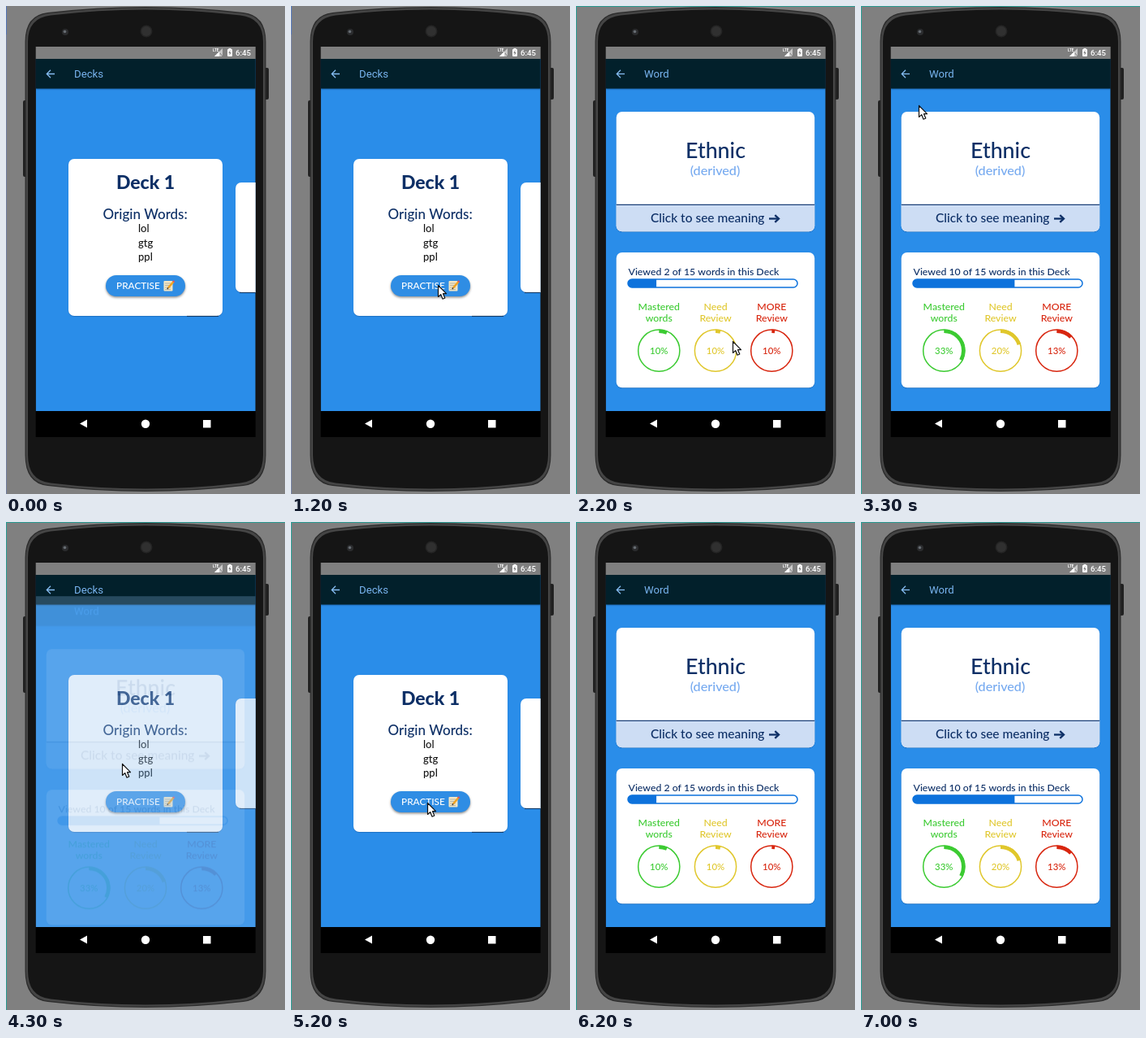
These frames come from a looping animation (344 by 600 pixels, 7100 ms). An HTML page with a canvas:

```html
<!DOCTYPE html>
<html lang="en">
<head>
<meta charset="utf-8">
<title>Flashcard decks</title>
<style>
html, body { margin: 0; width: 100%; height: 100%; overflow: hidden; background: #808080; }
canvas { display: block; width: 344px; height: 600px; }
</style>
</head>
<body>
<canvas id="stage"></canvas>
<script>
const W = 344, H = 600, LOOP = 7100, STEP = 100;
const LEFT = 36.7, WIDE = 271;
const BLUE = '#2a8de9', NAVY = '#0d2f66', FILL = '#0d72dc', HEAD = '#02202b', VEIL = '#8cbeee';
const DECK_ENTRIES = [1500, 5460], BACK = 4150;
const dpr = window.devicePixelRatio || 1;

function sheet(canvas) {
  canvas.width = W * dpr;
  canvas.height = H * dpr;
  const c = canvas.getContext('2d');
  c.scale(dpr, dpr);
  return c;
}
const stage = document.getElementById('stage');
const main = sheet(stage);
const layer = document.createElement('canvas');
const page = sheet(layer);

const clamp = (v, a = 0, b = 1) => Math.min(b, Math.max(a, v));
const mix = (a, b, k) => a + (b - a) * k;
const easeOut = k => 1 - (1 - k) ** 2;

function box(c, x, y, w, h, r, fill) {
  c.beginPath();
  c.roundRect(x, y, w, h, r);
  c.fillStyle = fill;
  c.fill();
}

function disc(c, x, y, r, fill) {
  c.beginPath();
  c.arc(x, y, r, 0, Math.PI * 2);
  c.fillStyle = fill;
  c.fill();
}

function poly(c, points, fill) {
  c.beginPath();
  points.forEach(([x, y]) => c.lineTo(x, y));
  c.closePath();
  c.fillStyle = fill;
  c.fill();
}

function line(c, points, color, width) {
  c.beginPath();
  points.forEach(([x, y]) => c.lineTo(x, y));
  c.strokeStyle = color;
  c.lineWidth = width;
  c.stroke();
}

function text(c, str, x, y, size, color, { align = 'center', weight = 500, face = 'Lato' } = {}) {
  c.font = `${weight} ${size}px ${face}, sans-serif`;
  c.textAlign = align;
  c.fillStyle = color;
  c.fillText(str, x, y);
}

function shadow(c, color, blur, dy, draw) {
  c.save();
  c.shadowColor = color;
  c.shadowBlur = blur * dpr;
  c.shadowOffsetY = dy * dpr;
  draw();
  c.restore();
}

function card(c, x, y, w, h) {
  shadow(c, 'rgba(0,30,80,.3)', 1, 0.7, () => box(c, x, y, w, h, 7, '#fff'));
}

// Case outline with bowed top and bottom, inset by d
function shell(c, d, fill) {
  const l = 23.5 + d, r = 320.5 - d, top = 8 + d, low = 590 - d;
  c.beginPath();
  c.moveTo(l, 44);
  c.quadraticCurveTo(l, top + 3, l + 28, top);
  c.quadraticCurveTo(172, top - 14, r - 28, top);
  c.quadraticCurveTo(r, top + 3, r, 44);
  c.lineTo(r, 552);
  c.quadraticCurveTo(r, low - 3, r - 28, low);
  c.quadraticCurveTo(172, low + 14, l + 28, low);
  c.quadraticCurveTo(l, low - 3, l, 552);
  c.fillStyle = fill;
  c.fill();
}

function phone(c, t) {
  c.fillStyle = '#808080';
  c.fillRect(0, 0, W, H);
  if (t < 1300) {
    c.fillStyle = '#7480a0';
    c.fillRect(0, 0, 1, H);
    c.fillStyle = '#5577b8';
    c.fillRect(0, 0, 1, 35);
  } else {
    c.fillStyle = '#2c9c94';
    c.fillRect(0, 0, W, 1);
    c.fillRect(0, 0, 1, H);
  }
  box(c, 21, 116, 5, 94, 2, '#202020');
  box(c, 318, 76, 6, 39, 2, '#202020');
  shell(c, 0, '#2c2c2c');
  shell(c, 1.2, '#454545');
  shell(c, 3.5, '#151515');
  disc(c, 173, 31, 7.5, '#242424');
  disc(c, 173, 31, 6, '#303030');
  disc(c, 73, 32, 4, '#2b2c2e');
  disc(c, 72.5, 31.5, 1.8, '#666c72');
}

function bars(c) {
  c.fillStyle = '#7f7f7f';
  c.fillRect(LEFT, 50, WIDE, 15);
  text(c, 'LTE', 255, 56, 4.5, '#fff', { align: 'left', weight: 700, face: 'Roboto' });
  poly(c, [[257, 62], [267, 62], [267, 52]], '#c9c9c9');
  poly(c, [[257, 62], [263, 62], [263, 56]], '#fff');
  line(c, [[264, 58], [267, 62]], '#7f7f7f', 1);
  box(c, 273, 53, 6, 9, 1, '#fff');
  c.fillStyle = '#fff';
  c.fillRect(274.5, 52, 3, 2);
  poly(c, [[276.5, 54], [274.3, 58], [275.8, 58], [275.4, 61], [277.7, 57], [276.2, 57]], '#7f7f7f');
  text(c, '6:45', 302, 61, 9.6, '#fff', { align: 'right', face: 'Roboto' });

  c.fillStyle = '#000';
  c.fillRect(LEFT, 498, WIDE, 32);
  poly(c, [[91, 513.5], [100, 508.5], [100, 518.5]], '#fff');
  disc(c, 172, 513.7, 5.2, '#fff');
  c.fillStyle = '#fff';
  c.fillRect(243, 509, 9.5, 9.5);
}

function header(c, title, arrow = 1) {
  c.fillStyle = BLUE;
  c.fillRect(LEFT, 65, WIDE, 433);
  shadow(c, 'rgba(0,20,50,.5)', 2, 0.7, () => {
    c.fillStyle = HEAD;
    c.fillRect(LEFT, 65, WIDE, 36.5);
  });
  c.globalAlpha = arrow;
  line(c, [[60, 83.5], [50.8, 83.5]], '#86bdf2', 1.3);
  line(c, [[55, 78.8], [50.3, 83.5], [55, 88.2]], '#86bdf2', 1.3);
  c.globalAlpha = 1;
  text(c, title, 84, 88, 13.2, '#79b4ef', { align: 'left', weight: 400, face: 'Roboto' });
}

function memo(c) {
  box(c, 194.5, 338, 11, 12.5, 1, '#f3e6c4');
  for (let y = 341; y < 350; y += 2.5) line(c, [[196, y], [203, y]], '#a9a79c', 0.8);
  line(c, [[206.5, 339], [200, 346.5]], '#f0a322', 2.6);
  line(c, [[207.3, 338], [206.2, 339.3]], '#d9516a', 2.6);
  line(c, [[200, 346.5], [198.8, 348]], '#4a3a2c', 1.4);
}

function decks(c) {
  header(c, 'Decks');
  card(c, 77, 188, 190, 193);
  line(c, [[223, 381.4], [262, 381.4]], '#12365f', 1);
  card(c, 283, 217, 190, 135);
  line(c, [[288, 352.4], [307, 352.4]], '#12365f', 1);
  text(c, 'Deck 1', 172, 225, 23, NAVY, { weight: 800 });
  text(c, 'Origin Words:', 171.7, 262, 17, NAVY);
  ['lol', 'gtg', 'ppl'].forEach((w, i) =>
    text(c, w, 163, 278 + 17.5 * i, 13, '#151515', { align: 'left' }));
  shadow(c, 'rgba(0,0,0,.45)', 3, 1.5, () => box(c, 123, 331, 98, 26, 13, '#2f8de4'));
  text(c, 'PRACTISE', 136, 348, 11.8, '#fff', { align: 'left' });
  memo(c);
}

function gauge(c, x, color, label, share, pct) {
  text(c, label[0], x, 374, 12.3, color);
  text(c, label[1], x, 387.5, 12.3, color);
  c.strokeStyle = color;
  c.lineWidth = 1.5;
  c.beginPath();
  c.arc(x, 423.7, 25.6, 0, Math.PI * 2);
  c.stroke();
  c.lineWidth = 4.5;
  c.beginPath();
  c.arc(x, 423.7, 24, -Math.PI / 2, Math.PI * (2 * share - 0.5));
  c.stroke();
  text(c, pct + '%', x, 428, 11.4, color);
}

// e: ms since the page was opened
function word(c, e, shown) {
  const count = clamp(Math.floor((e - 500) / 100), 0, 10);
  const drop = clamp(e / 500);
  const grown = count / 10;
  header(c, 'Word', shown ** 8);

  card(c, 49.7, 130, 244.5, 147.3);
  box(c, 49.7, 244, 244.5, 33.3, [0, 0, 7, 7], '#cdddf4');
  line(c, [[49.7, 244.3], [294.2, 244.3]], '#1c4179', 1.2);
  text(c, 'Ethnic', 172, 187, 26.8, NAVY);
  text(c, '(derived)', 171.5, 207.5, 16.2, '#76aaf0');
  text(c, 'Click to see meaning', 92, 266, 15.5, NAVY, { align: 'left' });
  line(c, [[238, 261.5], [249, 261.5]], NAVY, 2.3);
  line(c, [[245.3, 257.2], [250, 261.5], [245.3, 265.8]], NAVY, 2.3);

  card(c, 49.7, 303, 244.5, 166.3);
  text(c, `Viewed ${count} of 15 words in this Deck`, 64.5, 330.5, 12.3, NAVY, { align: 'left' });
  const level = mix(0.6, 0.06, drop) + 0.54 * grown;
  c.save();
  c.beginPath();
  c.roundRect(64, 336, 209, 10, 5);
  c.clip();
  c.fillStyle = FILL;
  c.fillRect(64, 336, 209 * level, 10);
  c.restore();
  c.strokeStyle = FILL;
  c.lineWidth = 1.5;
  c.beginPath();
  c.roundRect(64, 336, 209, 10, 5);
  c.stroke();

  const gauges = [
    [102.3, '#3ccb32', ['Mastered', 'words'], 33],
    [172, '#e0c72c', ['Need', 'Review'], 20],
    [241.3, '#d8260f', ['MORE', 'Review'], 13]
  ];
  for (const [x, color, label, goal] of gauges) {
    const share = 0.28 * (1 - drop) + goal / 100 * grown;
    gauge(c, x, color, label, share, Math.min(goal, count * 5));
  }

  // pale veil that clears as the page settles
  c.globalAlpha = 1 - shown;
  c.fillStyle = VEIL;
  c.fillRect(LEFT, 65, WIDE, 433);
  c.globalAlpha = 1;
}

// time, x, y of the pointer tip
const path = [
  [300, 344, 420], [800, 181, 343], [1600, 181, 343], [2200, 193, 412],
  [2500, 185, 390], [3300, 71, 122], [3600, 53, 82], [3900, 53, 82],
  [4300, 143, 297], [4700, 168, 345], [5400, 168, 345], [5700, 10, 322]
];

function pointer(c, t) {
  const i = path.findIndex(k => k[0] >= t);
  if (t < path[0][0] || i < 0) return;
  const [t1, x1, y1] = path[i];
  const [t0, x0, y0] = path[Math.max(0, i - 1)];
  const k = t1 > t0 ? (t - t0) / (t1 - t0) : 1;
  const s = k * k * (3 - 2 * k);
  c.save();
  c.translate(mix(x0, x1, s), mix(y0, y1, s));
  c.lineJoin = 'round';
  poly(c, [[0.5, 0.5], [0.5, 14.5], [3.7, 11.6], [6, 17.2], [8.8, 16], [6.5, 10.7], [10.5, 10.7]], '#fff');
  c.strokeStyle = '#111';
  c.lineWidth = 1.2;
  c.stroke();
  c.restore();
}

function wordState(t) {
  const start = t >= DECK_ENTRIES[1] ? DECK_ENTRIES[1] : DECK_ENTRIES[0];
  let shown = easeOut(clamp((t - start) / 350));
  if (start === DECK_ENTRIES[0] && t > BACK) shown = 1 - easeOut(clamp((t - BACK) / 300));
  return { age: t - start, shown };
}

function draw(t) {
  phone(main, t);
  const { age, shown } = wordState(t);
  main.save();
  main.beginPath();
  main.rect(LEFT, 65, WIDE, 433);
  main.clip();
  if (shown < 1) decks(main);
  if (shown > 0) {
    page.clearRect(0, 0, W, H);
    word(page, age, shown);
    main.globalAlpha = Math.min(1, shown * 1.45);
    main.drawImage(layer, 0, 35 * (1 - shown), W, H);
  }
  main.restore();
  bars(main);
  pointer(main, t);
}

function tick() {
  const t = performance.now() % LOOP;
  draw(Math.floor(t / STEP) * STEP);
  requestAnimationFrame(tick);
}
tick();
</script>
</body>
</html>
```
